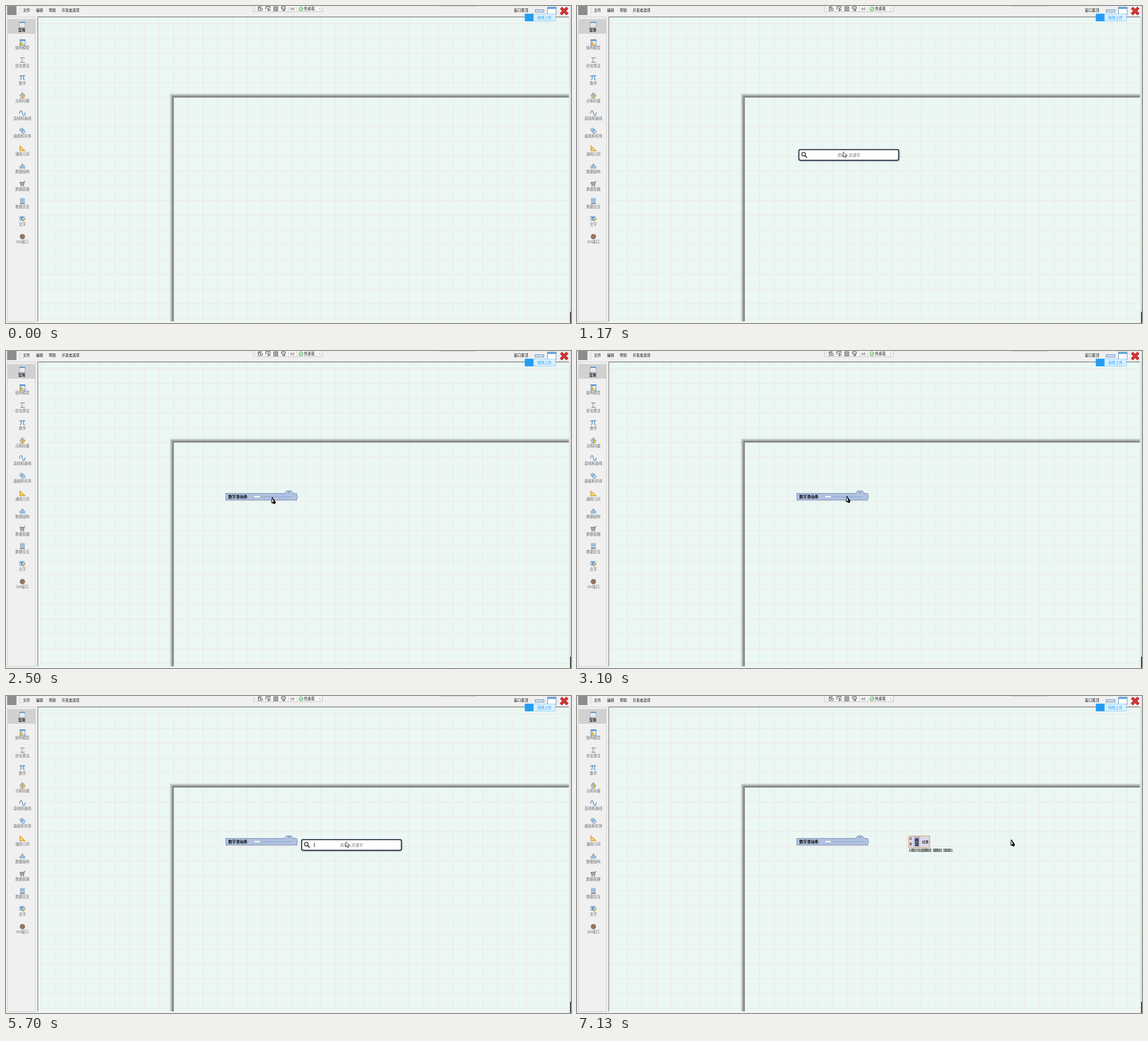
An HTML page that plays this animation: 999 px wide and 560 px high, repeating every 7.16 s.

```html
<!DOCTYPE html>
<html lang="zh">
<head>
<meta charset="utf-8">
<style>
html, body { margin: 0; width: 100%; height: 100%; overflow: hidden; background: #f0f0f0; }
svg { display: block; width: 999px; height: 560px; }
text { font-family: "Noto Sans CJK SC", "Noto Sans CJK", "Noto Sans", sans-serif; font-size: 6.3px; white-space: pre; }
.mid { text-anchor: middle; }
.bold { font-weight: 700; }
.line { fill: none; stroke: #333; stroke-width: .9; }
</style>
</head>
<body>
<svg viewBox="0 0 999 560" xmlns="http://www.w3.org/2000/svg">
  <defs>
    <pattern id="grid" x="296" y="161" width="26.02" height="26.02" patternUnits="userSpaceOnUse">
      <path d="M0 .5H26.02M.5 0V26.02" stroke="#f1e4e5" stroke-width="1"/>
    </pattern>
    <linearGradient id="edgeX"><stop stop-color="#777" stop-opacity="0"/><stop offset="1" stop-color="#666"/></linearGradient>
    <linearGradient id="edgeY" x2="0" y2="1"><stop stop-color="#777" stop-opacity="0"/><stop offset="1" stop-color="#666"/></linearGradient>
    <filter id="shade" x="-5%" y="-40%" width="110%" height="190%">
      <feDropShadow dx=".4" dy=".6" stdDeviation="1" flood-opacity=".5"/>
    </filter>
  </defs>

  <rect width="999" height="560" fill="#f0f0f0"/>
  <!-- canvas -->
  <rect x="56" y="19" width="939.5" height="538.5" fill="#eaf7f3"/>
  <rect x="56" y="19" width="939.5" height="538.5" fill="url(#grid)"/>
  <path d="M289 154L296.5 161.5V557.5H289Z" fill="url(#edgeX)"/>
  <path d="M289 154H995.5V161.5H296.5Z" fill="url(#edgeY)"/>
  <path d="M56.3 557.5V19.4H995.5" fill="none" stroke="#777" stroke-width="1.1"/>
  <path d="M56 557.8H996" stroke="#fafafa"/>
  <rect x="995.5" y="19" width="3.5" height="541" fill="#e3e5e6"/>
  <path d="M998.5 0V540" stroke="#c9ced2"/>
  <rect x="997.6" y="540" width="1.4" height="20" fill="#111"/>

  <!-- sidebar -->
  <rect x="2.5" y="19.5" width="49.5" height="538" fill="#f0f0f0" stroke="#d2d2d2"/>
  <rect x="3" y="23" width="49" height="26" fill="#d1d1d1"/>
  <g id="side"></g>

  <!-- menu -->
  <rect x="2" y="0" width="16.5" height="16" fill="#8c8c8c"/>
  <path d="M24.5 3V14" stroke="#b5b5b5" stroke-dasharray="1 1"/>
  <g fill="#111">
    <text x="30" y="10.3">文件</text><text x="53" y="10.3">编辑</text>
    <text x="75.8" y="10.3">帮助</text><text x="98.4" y="10.3">开发者选项</text>
    <text x="898" y="10.3">窗口置顶</text>
  </g>

  <!-- debug bar -->
  <path d="M438 0V10H559.5V0" fill="#f6f6f6" stroke="#c4c4c4"/>
  <path d="M441.5 2V8" stroke="#bbb" stroke-dasharray="1 1"/>
  <g class="line">
    <path d="M446 1.5H452M446 3.5H450M446 1.5V8H449"/><circle cx="451.5" cy="6" r="2"/>
    <path d="M460 6H459.5V1H467V4M463 3L467.5 7L465 7L463.8 9Z"/>
    <path d="M473.5 1.5H480.5V8.5H473.5ZM475.5 3.5H478.5V6.5H475.5Z"/>
    <path d="M487 5V1.5H494V5ZM488 7.5H493M491 5.5L493 7.5L491 9.5"/>
    <path d="M504.5 2.5Q502.5 5 504.5 7.5M508.3 2.5Q510.3 5 508.3 7.5M505.5 4.5H507.5M505.5 6H507.5" stroke-width=".7"/>
    <path d="M499.5 1V9M514.5 1V9" stroke="#ccc"/>
    <circle cx="521.5" cy="5" r="3.5" fill="#e7f6e7" stroke="#2f9e44"/>
    <path d="M519.7 5L521.2 6.6L523.6 3.3" stroke="#2f9e44"/>
    <path d="M556.3 2.7L553.8 5L556.3 7.3" stroke="#999" stroke-width=".7"/>
  </g>
  <text x="526.8" y="7.3" fill="#222">热重载</text>

  <!-- window buttons -->
  <path d="M766 0H831" stroke="#c5c5c5" stroke-width="1.4"/>
  <rect x="935.7" y="6.5" width="15.3" height="4.2" fill="#cfe2f5" stroke="#6b8fb5"/>
  <rect x="957.5" y="2" width="15.3" height="13" fill="#fff" stroke="#7193b6"/>
  <rect x="957.5" y="2" width="15.3" height="3.2" fill="#5ea0dd"/>
  <path d="M981.3 3.3L992.8 14.6M992.6 3L981 14.8" stroke="#8e1d1d" stroke-width="5"/>
  <path d="M981.3 3.3L992.8 14.6M992.6 3L981 14.8" stroke="#db3434" stroke-width="3.6"/>
  <rect x="917.7" y="14" width="53.8" height="12.7" rx="1.2" fill="#d9f0ff" stroke="#79c3f7" stroke-width=".7"/>
  <rect x="917.4" y="13.7" width="15.4" height="13.3" rx="1.2" fill="#249df5"/>
  <text x="939.3" y="22.8" fill="#35a5f4">拖拽上传</text>

  <!-- slider node -->
  <g id="slider">
    <path d="M388.7 251.6H491.5Q494 250.8 495 248.3Q495.6 247 497 247H503.5Q505 247 505.7 248.3Q507 250.8 509 251.6H514Q514.3 254 515.6 257.5Q514.3 261 514 263.4H388.7Z" fill="#b0c2e2" stroke="#4c5d86" stroke-width=".9" stroke-dasharray="2 1"/>
    <text x="393" y="259.6" class="bold" style="font-size:6.8px">数字滑动条</text>
    <path d="M450 257.6H505" stroke="#64789f" stroke-width=".8" stroke-dasharray="2 1.5"/>
    <rect x="438.6" y="255.8" width="10.6" height="3" fill="#fff" stroke="#999" stroke-width=".4"/>
    <path d="M499 249H501.8L500.4 250.7Z" fill="#4c5d86"/>
  </g>

  <!-- sum node -->
  <g id="sum">
    <path d="M586.3 247.2H623.5V254Q625.8 257.7 623.5 261.4V268H586.3V265.5Q585 262.5 586.3 259.5V255.5Q585 252.5 586.3 249.5Z" fill="#ded7ea" stroke="#d8a244" stroke-width="1"/>
    <rect x="595.4" y="248" width="10.8" height="19.4" fill="#b3bbe0"/>
    <text x="600.8" y="256.7" class="mid bold" style="font-size:7px">相</text>
    <text x="600.8" y="264.2" class="mid bold" style="font-size:7px">加</text>
    <text x="588" y="254.2">A</text><text x="588" y="264">B</text>
    <text x="610.2" y="259.6" style="font-size:5.9px">结果</text>
    <g class="bold" style="font-size:2.7px">
      <text x="586.8" y="271.6" style="font-size:2.7px">[A] 数据不可为空且类型需要匹配，当数据缺失时，运算将被终止。</text>
      <text x="586.8" y="275" style="font-size:2.7px">[B] 数据不可为空且类型需要匹配，当数据缺失时，运算将被终止。</text>
    </g>
  </g>

  <!-- search -->
  <g id="search">
    <g id="drop">
      <rect x="393" y="272" width="175" height="14.5" fill="#fff" stroke="#aab" stroke-width=".7" filter="url(#shade)"/>
      <rect x="394" y="274.5" width="173" height="11" fill="#d6e6f7"/>
      <text id="hit" x="414" y="282.3" fill="#222"></text>
    </g>
    <rect x="392.4" y="253.8" width="176.3" height="18.6" rx="2.6" fill="#fff" stroke="#10142a" stroke-width="1.5" filter="url(#shade)"/>
    <circle cx="400.6" cy="261.8" r="3.2" fill="none" stroke="#444" stroke-width="1.5"/>
    <path d="M402.9 264.1L406 267.2" stroke="#444" stroke-width="2" stroke-linecap="round"/>
    <text id="hint" x="480.6" y="265.5" class="mid" fill="#777" style="font-size:6.8px">请输入关键字</text>
    <text id="typed" x="414" y="265.5" fill="#111" style="font-size:6.8px"></text>
    <path id="caret" d="M0 259.3V267" stroke="#111" stroke-width=".9"/>
  </g>

  <g id="arrow"><path d="M0 0V9.3L2.1 7.4L3.6 10.8L5.1 10.1L3.7 6.9H6.5Z" fill="#fff" stroke="#222" stroke-width=".8"/></g>
  <g id="pen">
    <path d="M1.2 0L7 8.8L5.6 11.6L0 9.2Z" fill="#eef5f3" stroke="#111" stroke-width="1.1" stroke-linejoin="round"/>
    <path d="M1.2 0L7 8.8L5.6 11.6L4.2 9.5L3.2 6.2Z" fill="#111"/>
    <path d="M0 9.2L3.6 7.6L5.6 11.6Z" fill="#111"/>
  </g>
</svg>
<script>
const LOOP = 7160, STEP = 1000 / 30;
const $ = id => document.getElementById(id);
const show = (id, on) => $(id).setAttribute('visibility', on ? 'inherit' : 'hidden');
const move = (id, x, y) => $(id).setAttribute('transform', `translate(${x} ${y})`);

const blue = 'stroke="#3f82bd" fill="none" stroke-width="1.2"';
const pale = 'fill="#bcd8f0" stroke="#5b8db8" stroke-width=".7"';
const grey = 'stroke="#777" fill="none" stroke-width="1"';
const gold = 'fill="#f2bd42" stroke="#b98520" stroke-width=".6"';

// icons drawn around their own centre
const items = [
  ['常用', `<rect x="-5" y="-5" width="9.5" height="9.5" fill="#f8fafc" stroke="#7590aa" stroke-width=".7"/><path d="M-5 -4H4.5" stroke="#5d93c8" stroke-width="2"/><path d="M-3 0H3M-3 2H3" stroke="#ccd"/>`],
  ['结构模型', `<rect x="-4.5" y="-5" width="9.5" height="10" ${pale}/><path d="M-4.5 -4H5" stroke="#4789c6" stroke-width="2"/><path d="M1 -3V5M-2 0H5" stroke="#fff"/><path d="M-4 5V1L-2 -1L0 1V5Z" ${gold}/>`],
  ['优化算法', `<path d="M3.2 -2.5V-4H-3L.5 0L-3 4H3.2V2.5" ${grey}/>`],
  ['数学', `<path d="M-5 -2Q-4.5 -3.6 -3 -3.6H5M-1.8 -3.4Q-1.8 2 -3.5 4M2 -3.4V2.4Q2.2 4.2 4.3 3.2" ${blue}/>`],
  ['点和向量', `<path d="M-5 1L0 -5L5 1" ${grey}/><path d="M-3 5V0L0 -3V5Z" ${pale}/><path d="M0 5V-1L3 -1L4 3L2 5Z" ${gold}/>`],
  ['直线和曲线', `<path d="M-5 1C-4 -6 -1.5 -6 0 0S4 6 5 -1" ${blue}/>`],
  ['曲面和实体', `<circle cx="-1.5" cy="-1.3" r="3.2" ${pale}/><circle cx="1.6" cy="1.5" r="3.2" ${pale}/><path d="M-4 -1H4M0 -4V4" stroke="#5b8db8" stroke-width=".6"/>`],
  ['通用几何', `<path d="M-4.8 -5V4.5H5.5Z" ${gold}/><path d="M-2.6 -.3V2.5H.6Z" fill="#f0f0f0"/>`],
  ['数据结构', `<path d="M-4.5 4V0H-2V4ZM-1.2 4V-1H1.2V4ZM2 4V0H4.5V4Z" ${pale}/><path d="M0 -4V-1M-2 -2.5H2" ${grey}/>`],
  ['数据容器', `<path d="M5 -4H3.5L2.5 2H-3L-4.5 -2.5H3" fill="#aaa" stroke="#666" stroke-width=".9"/><circle cx="-2.3" cy="4" r="1" fill="#555"/><circle cx="2" cy="4" r="1" fill="#555"/>`],
  ['数据交互', `<rect x="-3.5" y="-5" width="7" height="7" ${pale}/><path d="M-3 -3H3M-3 -1H3" stroke="#6d8ca8" stroke-width=".7"/><path d="M-4.5 4H4.5M0 2V4" stroke="#777" stroke-width="1.3"/>`],
  ['文字', `<rect x="-4.8" y="-4.5" width="8" height="7" ${pale}/><path d="M-3.5 -2.7H1.5M-1 -2.7V2" stroke="#265f96" stroke-width="1.2"/><path d="M0 4L4.5 -1.5L5.5 -.5L1.5 4.5Z" ${gold}/>`],
  ['GH接口', `<circle r="4.7" fill="#93745f"/>`]
];
$('side').innerHTML = items.map(([name, icon], i) => {
  const y = 33.2 + i * 31.18;
  return `<g transform="translate(29 ${y})">${icon}</g>` +
    `<text x="${i ? 29 : 27.7}" y="${y + 12.1}" class="mid${i ? '' : ' bold'}" fill="${i ? '#666' : '#111'}">${name}</text>`;
}).join('');

// pointer path: time, x, y
const path = [
  [400, 856, 246], [520, 745, 268], [640, 590, 273], [740, 500, 262], [830, 469.5, 258.5],
  [3030, 469.5, 258.5], [3100, 476, 256.5], [3230, 590, 278], [3370, 738, 303],
  [3470, 742, 292], [3590, 640, 266], [3700, 599.8, 258.3],
  [7030, 599.8, 258.3], [7060, 660, 256], [7130, 847, 252]
];
function pointer(t) {
  const i = path.findIndex(p => p[0] > t);
  if (i < 1) return null;
  const [a, b] = [path[i - 1], path[i]], k = (t - a[0]) / (b[0] - a[0]);
  return [a[1] + (b[1] - a[1]) * k, a[2] + (b[2] - a[2]) * k];
}

// search sessions: typed text grows at the listed times
const sessions = [
  { from: 1130, to: 2440, dx: 0, hit: '数字滑动条', keys: [[1730, 's'], [1765, 'sz'], [2270, 'szh'], [2340, 'szhd'], [2400, 'szhdt']] },
  { from: 4100, to: 6230, dx: 130.4, hit: '相加', keys: [[5765, 'j'], [5830, 'ji'], [5900, 'jia']] }
];

function draw(t) {
  const s = sessions.find(s => t >= s.from && t < s.to);
  show('search', s);
  if (s) {
    const key = s.keys.filter(k => k[0] <= t).pop(), word = key ? key[1] : '';
    const blink = Math.floor((t - s.from - 40) / 525) % 2;
    move('search', s.dx, 0);
    $('typed').textContent = word;
    $('hit').textContent = s.hit;
    show('hint', !word);
    show('drop', word);
    show('caret', t >= s.from + 35 && blink === 0);
    move('caret', 414.8 + (word ? $('typed').getComputedTextLength() : 0), 0);
  }
  show('slider', t >= 2440);
  show('sum', t >= 6240);

  const p = pointer(t);
  show('arrow', p && s);
  show('pen', p && !s);
  if (p) {
    move('arrow', p[0] + 1.2, p[1] - 1);
    move('pen', p[0], p[1]);
  }
}

const start = performance.now();
function tick() {
  const t = (performance.now() - start) % LOOP;
  draw(Math.floor(t / STEP + .01) * STEP);
  requestAnimationFrame(tick);
}
draw(0);
requestAnimationFrame(tick);
</script>
</body>
</html>
```
